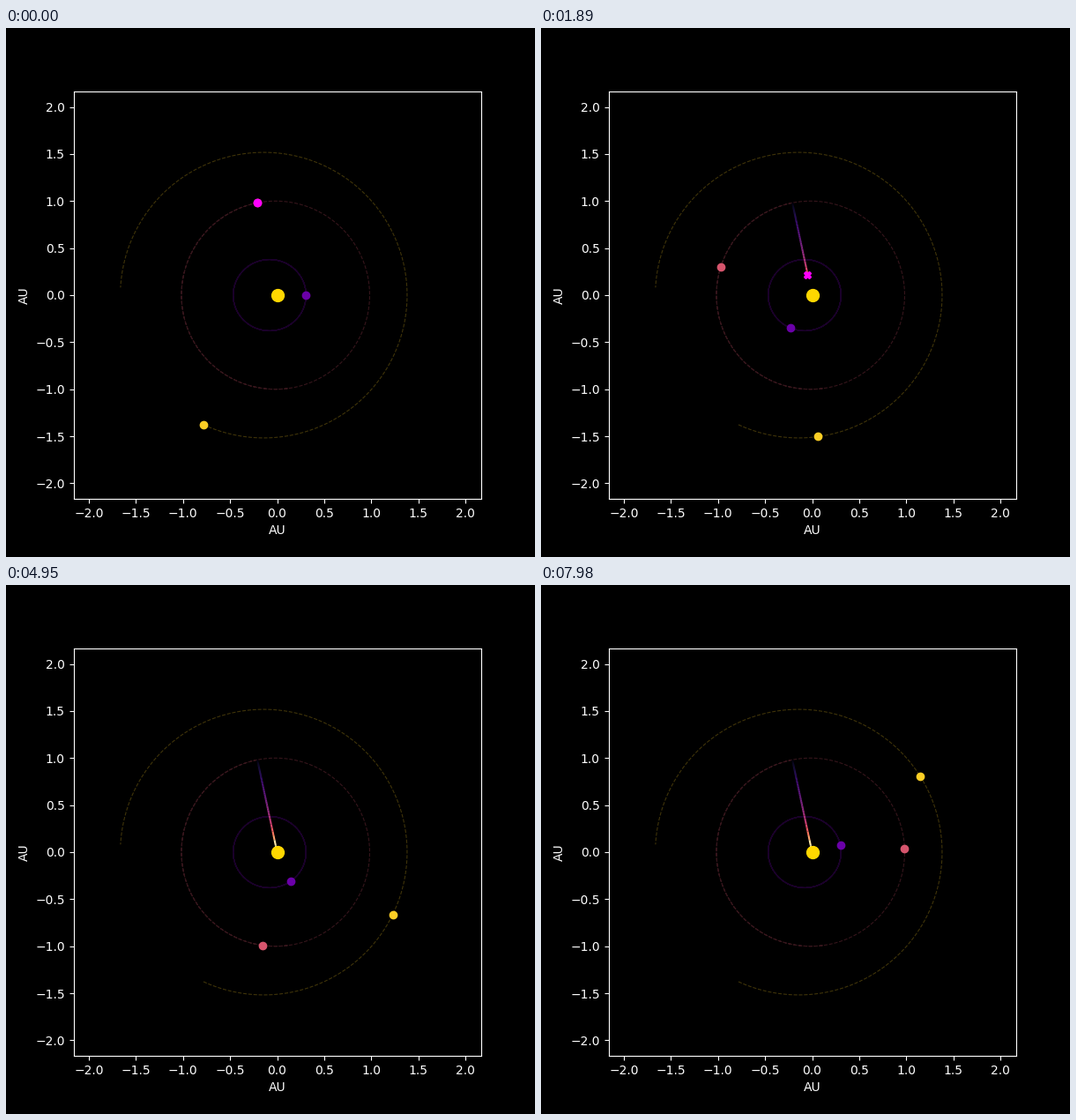
These frames come from a looping animation (600 px wide and 600 px high, 8000 ms). A matplotlib script:

```python
import numpy as np
import matplotlib.pyplot as plt
from matplotlib.animation import FuncAnimation
from matplotlib.collections import LineCollection

LOOP, TICK, DAY_MS = 8000, 20, 30
DAYS = 548
GM = (2 * np.pi / 365.25) ** 2   # AU^3 / day^2
SUN_RADIUS = 0.06
LIMIT = 2.164

plt.rcParams.update({
    "font.family": "DejaVu Sans",
    "figure.facecolor": "black",
    "axes.facecolor": "black",
    "axes.edgecolor": "white",
    "axes.labelcolor": "white",
    "xtick.color": "white",
    "ytick.color": "white",
})


def orbit(a, e, period, m0):
    """Daily positions on a Kepler ellipse with its perihelion on +x."""
    m = np.radians(m0) + 2 * np.pi * np.arange(DAYS) / period
    ecc = m.copy()
    for _ in range(12):
        ecc -= (ecc - e * np.sin(ecc) - m) / (1 - e * np.cos(ecc))
    return np.column_stack([a * (np.cos(ecc) - e),
                            a * np.sqrt(1 - e * e) * np.sin(ecc)])


def free_fall(start):
    """Drop from rest towards the sun with one Euler step per day."""
    pos, vel = np.array(start), np.zeros(2)
    path, speed = [pos], [0.0]
    while np.hypot(*pos) > SUN_RADIUS and len(path) < 90:
        acc = -GM * pos / np.hypot(*pos) ** 3
        nxt = pos + vel
        vel = vel + acc
        if nxt @ start <= 0:      # do not shoot past the sun
            nxt = np.zeros(2)
        pos = nxt
        path.append(pos)
        speed.append(np.hypot(*vel))
    return np.array(path), np.array(speed)


# semi-major axis, eccentricity, period in days, mean anomaly at the start
orbits = [
    orbit(0.3871, 0.2056, 87.969, 0.0),
    orbit(1.0, 0.0167, 365.256, 100.2),
    orbit(1.5237, 0.0934, 686.98, 250.0),
]
colors = plt.cm.plasma(np.linspace(0.2, 0.9, 3))
fall, speed = free_fall(orbits[1][0])
segments = np.stack([fall[:-1], fall[1:]], axis=1)
trail_colors = plt.cm.magma(np.clip(speed[:-1] / 0.062, 0, 1))

fig, ax = plt.subplots(figsize=(6, 6), dpi=100)
ax.set_aspect("equal")
ax.set(xlim=(-LIMIT, LIMIT), ylim=(-LIMIT, LIMIT), xlabel="AU", ylabel="AU")
ticks = np.arange(-2, 2.1, 0.5)
ax.set_xticks(ticks)
ax.set_yticks(ticks)

for path, color in zip(orbits, colors):
    ax.plot(*path.T, "--", color=color, lw=0.8, alpha=0.25)
planets = [ax.plot([], [], "o", color=c, ms=6, zorder=4)[0] for c in colors]
trail = ax.add_collection(LineCollection([], linewidths=1.5, zorder=3))
probe, = ax.plot([], [], "o", color="magenta", ms=6, zorder=5)
ax.plot(0, 0, "o", color="gold", ms=10, zorder=6)


def update(i):
    day = (i * TICK + TICK // 2) // DAY_MS
    for planet, path in zip(planets, orbits):
        planet.set_data(*path[day:day + 1].T)
    trail.set_segments(segments[:day])
    trail.set_color(trail_colors[:day])
    probe.set_data(*fall[day:day + 1].T)
    probe.set_marker("X" if day else "o")
    return [*planets, trail, probe]


anim = FuncAnimation(fig, update, frames=LOOP // TICK, interval=TICK,
                     repeat=True, repeat_delay=0, blit=False)
plt.show()
```
